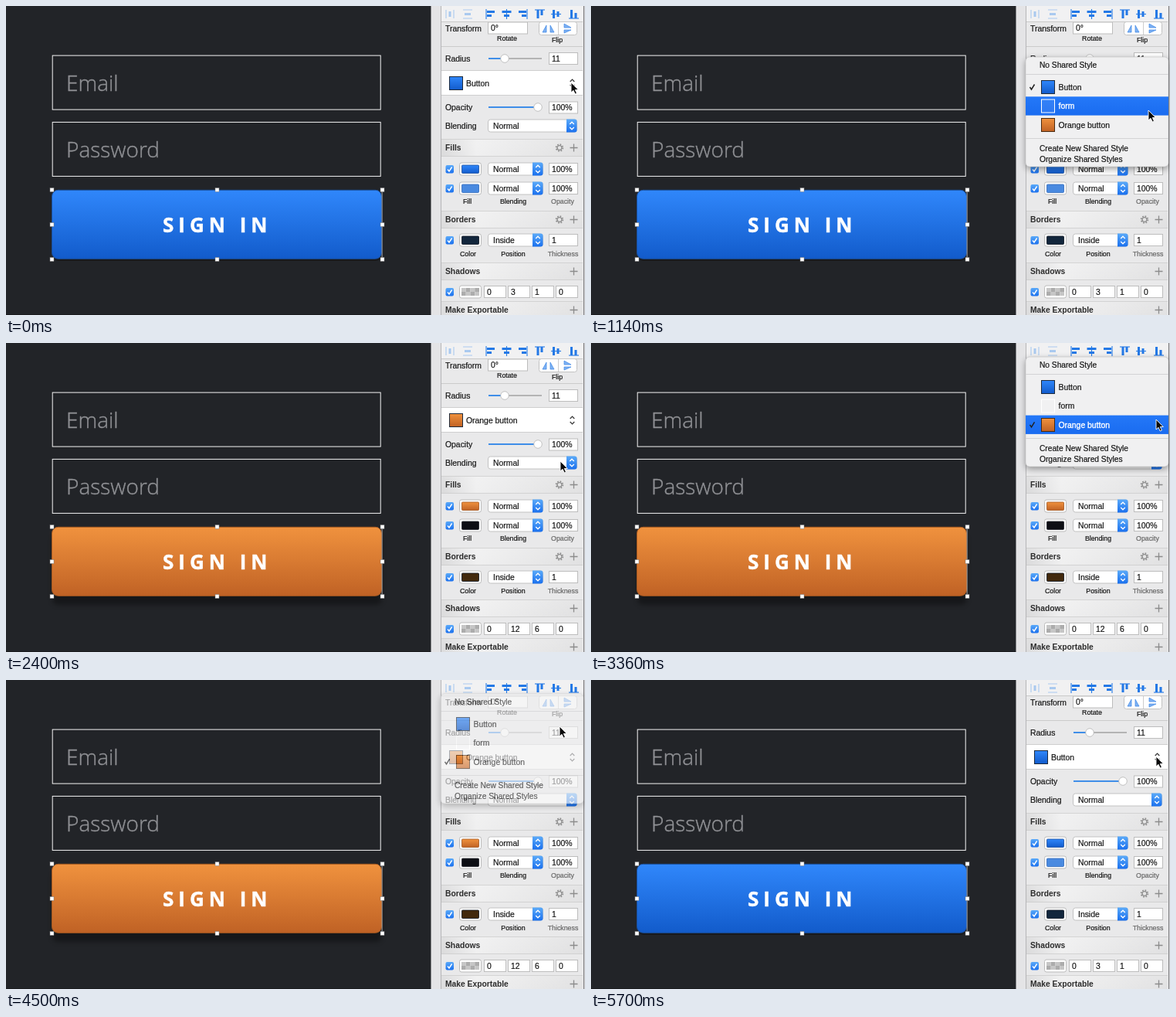
Animation of 750x400 px, one loop 5760 ms. Source, as an HTML page:

```html
<!DOCTYPE html>
<html lang="en">
<head>
<meta charset="utf-8">
<title>Shared styles</title>
<style>
html, body { margin: 0; width: 100%; height: 100%; overflow: hidden; background: #222428; }
svg { display: block; width: 750px; height: 400px; }
text { font: 10.4px "Liberation Sans", Arial, sans-serif; fill: #161616; stroke: #161616; stroke-width: .2px; white-space: pre; }
text.b { font-weight: bold; fill: #2c2c2c; stroke: none; font-size: 10.3px; }
text.s { font-size: 8.8px; }
text.cmd { font-size: 10.2px; }
text.dim { fill: #666; stroke: #666; }
text.on { fill: #fff; stroke: #fff; stroke-width: .35px; }
text.in { font: 300 28px "Open Sans", sans-serif; fill: #8f9094; stroke: #8f9094; stroke-width: .4px; }
text.cta { font: 700 26px "Open Sans", sans-serif; letter-spacing: 6px; fill: #fff; stroke: #fff; stroke-width: .5px; }
</style>
</head>
<body>
<svg id="stage" viewBox="0 0 750 400" xmlns="http://www.w3.org/2000/svg"></svg>
<script>
const LOOP = 5760, STEP = 60;
const stage = document.getElementById('stage');

const rect = (x, y, w, h, fill, more = '') =>
  `<rect x="${x}" y="${y}" width="${w}" height="${h}" fill="${fill}" ${more}/>`;
const path = (d, stroke, w = 1, fill = 'none') =>
  `<path d="${d}" stroke="${stroke}" stroke-width="${w}" fill="${fill}"/>`;
const text = (x, y, s, cls = '', more = '') =>
  `<text x="${x}" y="${y}" class="${cls}" ${more}>${s}</text>`;
const small = (x, y, s, cls = '') => text(x, y, s, 's ' + cls, 'text-anchor="middle"');
const group = (id, body) => `<g id="${id}">${body}</g>`;
const grad = (id, a, b) =>
  `<linearGradient id="${id}" x2="0" y2="1"><stop stop-color="${a}"/><stop offset="1" stop-color="${b}"/></linearGradient>`;

const defs = '<defs>' +
  grad('blue', '#3087fb', '#125bcb') +
  grad('orange', '#f0923e', '#c06225') +
  grad('head', '#dcdcdd', '#d6d6d7') +
  grad('hot', '#2478f8', '#1a6cf0') +
  grad('cap', '#5baaf9', '#1a70ee') +
  '<linearGradient id="shine"><stop offset="0" stop-color="#fff" stop-opacity=".1"/>' +
  '<stop offset=".25" stop-color="#fff" stop-opacity=".62"/><stop offset="1" stop-color="#fff" stop-opacity=".25"/></linearGradient>' +
  '<filter id="soft" x="-20%" y="-20%" width="140%" height="150%"><feGaussianBlur stdDeviation="4"/></filter>' +
  '<filter id="blur" x="-20%" y="-20%" width="140%" height="150%"><feGaussianBlur stdDeviation="3"/></filter></defs>';

/* ---- design canvas ---- */
const outline = (y, label) =>
  rect(60.2, y + .1, 425, 70, 'none', 'stroke="#f4f4f4"') + text(78, y + 45.7, label, 'in');

const button = (fill, edge, drop, blur) =>
  rect(60, 238 + drop, 427, 90, '#000', `rx="8" opacity="${blur ? .35 : .3}" ${blur ? 'filter="url(#blur)"' : ''}`) +
  rect(59.5, 238.3, 427, 89, `url(#${fill})`, `rx="8" stroke="${edge}"`);

function handles() {
  let out = path('M487.1 240V328', '#d0d0d0', .8);
  for (const x of [59.5, 273.5, 487.5])
    for (const y of [238, 283, 328])
      if (x !== 273.5 || y !== 283)
        out += rect(x - 2.5, y - 2.5, 5, 5, '#fff', 'stroke="#777" stroke-width=".5"');
  return out;
}

const canvas = rect(0, 0, 551, 400, '#222428') +
  rect(0, 399, 551, 1, '#1a1b1e') +
  outline(64, 'Email') + outline(150.3, 'Password') +
  group('btnBlue', button('blue', '#1a4f9c', 2, false)) +
  group('btnOrange', button('orange', '#a85a20', 11, true)) +
  text(203, 293, 'SIGN IN', 'cta') + handles();

/* ---- inspector widgets ---- */
const field = (x, y, w, s) =>
  rect(x + .5, y - 7.5, w, 15, '#fff', 'stroke="#bdbdbd"') + text(x + 4, y + 3.6, s);

const arrows = (x, y, color, w = 1.3) =>
  path(`M${x - 2.8} ${y - 2}l2.8 -2.8l2.8 2.8M${x - 2.8} ${y + 2}l2.8 2.8l2.8 -2.8`, color, w);

const select = (x, y, w, s) =>
  rect(x + .5, y - 8, w, 16, '#fff', 'rx="3" stroke="#c2c2c2"') +
  `<path d="M${x + w - 13} ${y - 8.5}h10.5a3 3 0 0 1 3 3v11a3 3 0 0 1 -3 3h-10.5z" fill="url(#cap)"/>` +
  arrows(x + w - 6, y, '#fff') + text(x + 7, y + 3.6, s);

const check = y => rect(569.5, y - 5, 10.5, 10.5, 'url(#cap)', 'rx="2"') +
  path(`M572 ${y + .5}l2 2.5l3.6 -5.5`, '#fff', 1.4);

const well = y => rect(587.5, y - 8, 28, 16, '#fdfdfd', 'rx="2.5" stroke="#bcbcbc"');
const chip = (y, fill, edge) => rect(590.5, y - 5, 22, 10.5, fill, `rx="1" stroke="${edge}" stroke-width=".8"`);

const slider = (y, x, end) => path(`M625 ${y}H${end}`, '#b4b4b4', 2) +
  path(`M625 ${y}H${x}`, '#3f8ee8', 2) +
  `<circle cx="${x}" cy="${y}" r="5.3" fill="#fff" stroke="#b5b5b5" stroke-width=".8"/>`;

const plus = y => path(`M730.5 ${y}H740.5M735.5 ${y - 5}V${y + 5}`, '#8c8c8c', 1.3);
const gear = y => `<circle cx="717" cy="${y}" r="4.3" fill="none" stroke="#909090" stroke-width="1.9" stroke-dasharray="1.7 1.68"/>` +
  `<circle cx="717" cy="${y}" r="2.9" fill="none" stroke="#909090" stroke-width="1.3"/>`;

const header = (y, h, s, hasGear) =>
  rect(564, y, 183, h, 'url(#head)') + rect(564, y, 183, h, 'url(#shine)') +
  path(`M564 ${y + .5}H747M564 ${y + h - .5}H747`, '#cdcdcd', .8) +
  text(569, y + 15, s, 'b') + plus(y + 11.5) + (hasGear ? gear(y + 11.5) : '');

const swatch = (x, y, fill, edge = '#1d2a3c') => rect(x + .5, y + .5, 17, 17, fill, `stroke="${edge}"`);

function toolbar() {
  const c = '#2479e6', faint = '#a9c9ef';
  const bars = (x, d, color = c) => path(d.replace(/X/g, x), color, 1.1);
  const block = (x, y, w, h, color = c) => rect(x, y, w, h, color);
  return rect(564, 0, 183, 20, '#f1f1f2') + path('M564 20.5H747', '#c9c9c9') +
    bars(570, 'MX 5V16M580 5V16', faint) + block(573.5, 7, 3, 7, faint) +
    bars(592, 'MX 5H604M592 16H604', faint) + block(594, 9, 8, 3, faint) +
    bars(622, 'MX 4V17') + block(623, 6, 10, 3) + block(623, 11, 6, 3) +
    bars(648.5, 'MX 4V17') + block(642.5, 6, 12, 3) + block(645, 11, 7, 3) +
    bars(675, 'MX 4V17') + block(664, 6, 10, 3) + block(668, 11, 6, 3) +
    bars(685, 'MX 5H698') + block(687.5, 5, 3, 11) + block(692.5, 5, 3, 7) +
    bars(706, 'MX 10.5H719') + block(708, 5, 3, 11) + block(713.5, 7, 3, 7) +
    bars(729, 'MX 16H742') + block(731, 5, 3, 11) + block(736.5, 9, 3, 7);
}

const look = (name, fill, edge, second, secondEdge, border, drop, blur) =>
  swatch(574, 91, `url(#${fill})`) + text(596, 104, name) +
  chip(211, `url(#${fill})`, edge) + chip(236, second, secondEdge) + chip(303, border, '#0c1420') +
  field(650, 370, 28, drop) + field(681, 370, 28, blur);

const checker = [0, 1, 2, 3, 4, 5, 6, 7].map(i =>
  rect(590 + (i % 4) * 5.75, 365 + (i >> 2) * 5, 5.75, 5, (i + (i >> 2)) % 2 ? '#acacac' : '#c6c6c6')).join('');

const panel = rect(550.5, 0, 199.5, 400, '#e4e4e6') +
  rect(563, 0, 185, 400, '#e9e9ea') +
  path('M563.5 0V400', '#b5b5b7') + path('M748.5 0V400', '#77777a') + rect(749, 0, 1, 400, '#dcdcde') +
  text(569, 33, 'Transform') + field(624, 28.5, 51, '0°') + small(649, 45, 'Rotate') +
  rect(690.5, 20.5, 49, 17, '#fff', 'rx="3" stroke="#c2c2c2"') + path('M715.5 21V37', '#cccccc') +
  path('M700 25v9h-5zM705 25v9h5z', '#3b86e6', .7, '#7fb2f3') +
  path('M723 28v-5l9 5zM723 31v4l9 -4z', '#3b86e6', .7, '#7fb2f3') +
  small(714, 47, 'Flip') + toolbar() +
  path('M564 52.5H747', '#cbcbcb') +
  text(569, 72, 'Radius') + slider(68, 646, 694) + field(703, 68, 37, '11') +
  group('stepper', rect(729, 60.5, 11.5, 15, '#f3f3f3', 'stroke="#c5c5c5" stroke-width=".8"') +
    path('M732.7 66l2 -2.6l2 2.6zM732.7 70l2 2.6l2 -2.6z', 'none', 0, '#777')) +
  rect(564, 84, 183, 31, '#fff') + path('M564 83.5H747M564 115.5H747', '#cfcfcf') +
  arrows(733.5, 100, '#333', 1.2) +
  text(569, 135, 'Opacity') + slider(131, 689, 692) + field(703, 131.5, 37, '100%') +
  text(569, 158.7, 'Blending') + select(624, 155, 115, 'Normal') +
  header(172, 23, 'Fills', true) +
  [211, 236].map(y => check(y) + well(y) + select(624, y, 71, 'Normal') + field(703, y, 37, '100%')).join('') +
  small(597.5, 256, 'Fill') + small(657, 256, 'Blending') + small(721, 256, 'Opacity', 'dim') +
  header(265, 23, 'Borders', true) +
  check(303) + well(303) + select(624, 303, 71, 'Inside') + field(703, 303, 37, '1') +
  small(598.5, 324, 'Color') + small(657, 324, 'Position') + small(721.5, 324, 'Thickness', 'dim') +
  header(332, 23, 'Shadows', false) +
  check(370) + well(370) + checker + field(619, 370, 28, '0') + field(712, 370, 28, '0') +
  header(382, 24, 'Make Exportable', false) +
  group('lookBlue', look('Button', 'blue', '#1b4f9e', '#4a8ae0', '#2f69ba', '#12263c', '3', '1')) +
  group('lookOrange', look('Orange button', 'orange', '#a4561f', '#0d0e14', '#22242c', '#42290d', '12', '6'));

/* ---- style menu ---- */
const ROW = 24.3, ROWS_TOP = 93;
const rows = ['Button', 'form', 'Orange button'];
const icon = [
  swatch(583, 96, 'url(#blue)'),
  rect(583.5, 121, 17, 17, '#fff', 'fill-opacity=".08" stroke="#fff"'),
  swatch(583, 145, 'url(#orange)', '#4a2a10')
];
const menu = group('menu',
  rect(563, 69, 185, 142, '#000', 'rx="5" opacity=".38" filter="url(#soft)"') +
  rect(563, 66, 185, 142, '#f0f0f1', 'rx="5" stroke="#c0c0c2" stroke-width=".6"') +
  `<rect id="bar" x="563" width="185" height="${ROW}" fill="url(#hot)"/>` +
  path('M563 88.5H748M563 171.5H748', '#d3d3d5') +
  text(581, 80, 'No Shared Style', 'cmd') +
  rows.map((s, i) => icon[i] + text(605.5, 109 + i * 24.4, s, '', `id="row${i}"`)).join('') +
  group('mark', path('M568.5 105l2 3l4 -6.5', '#222', 1.5)) +
  text(581, 188, 'Create New Shared Style', 'cmd') + text(581, 202, 'Organize Shared Styles', 'cmd'));

const cursors =
  group('arrow', path('M0 0V13L3 10.3L5.2 15L7.4 14L5.3 9.5H9.3Z', '#fff', .9, '#0a0a0a')) +
  group('beam', path('M-3 -6.5Q0 -6.5 0 -4.5V4.5Q0 6.5 -3 6.5M3 -6.5Q0 -6.5 0 -4.5M0 4.5Q0 6.5 3 6.5M-1.5 2.5H1.5', '#222', 1.1));

stage.innerHTML = defs + canvas + panel + menu + cursors;

/* ---- timeline ---- */
const el = id => document.getElementById(id);
const show = (id, on) => el(id).setAttribute('visibility', on ? 'visible' : 'hidden');
const move = (id, x, y) => el(id).setAttribute('transform', `translate(${x} ${y})`);

// time, x, y of the pointer
const track = [
  [0, 732, 99], [60, 732, 99], [600, 722, 106], [960, 722, 106], [1140, 722, 135],
  [1440, 718, 153], [2940, 718, 153], [3240, 732, 99], [3720, 732, 99], [4080, 717, 60],
  [4560, 717, 60], [4740, 718, 62], [5100, 717, 9], [5220, 718, 10], [5460, 727, 45],
  [5700, 732, 99], [LOOP, 732, 99]
];
const menus = [
  { open: 120, fade: 1800, shut: 2040, dy: 0, mark: 0 },
  { open: 3300, fade: 4380, shut: 4620, dy: -48, mark: 2 }
];

function pointer(t) {
  const i = track.findIndex(k => k[0] > t);
  const [t0, x0, y0] = track[i - 1], [t1, x1, y1] = track[i];
  const p = (t - t0) / (t1 - t0), e = p * p * (3 - 2 * p);
  return [x0 + (x1 - x0) * e, y0 + (y1 - y0) * e];
}

function draw(t) {
  const [x, y] = pointer(t);
  const m = menus.find(k => t >= k.open && t < k.shut);
  show('menu', m);
  if (m) {
    const gone = Math.max(0, (t - m.fade) / (m.shut - m.fade));
    el('menu').setAttribute('opacity', 1 - gone ** 1.5);
    move('menu', 0, m.dy);
    move('mark', 0, m.mark * 24.4);
    const blink = t >= m.fade - 120 && t < m.fade - 60;
    const over = t >= m.fade || blink ? -1 : Math.floor((y - m.dy - ROWS_TOP) / ROW);
    el('bar').setAttribute('y', ROWS_TOP + over * ROW);
    el('bar').setAttribute('opacity', over < 0 ? 0 : 1);
    rows.forEach((_, i) => el('row' + i).setAttribute('class', i === over ? 'on' : ''));
  }
  const orangeLook = t >= 2040 && t < 4620;
  const orangeBtn = t >= 2160 && t < 4680;
  show('lookBlue', !orangeLook);
  show('lookOrange', orangeLook);
  show('btnBlue', !orangeBtn);
  show('btnOrange', orangeBtn);

  const typing = !m && x > 703 && y >= 59 && y <= 76;
  show('stepper', typing);
  show('beam', typing);
  show('arrow', !typing);
  move(typing ? 'beam' : 'arrow', x, y);
}

function frame() {
  const t = performance.now() % LOOP;
  draw(Math.floor(t / STEP) * STEP);
  requestAnimationFrame(frame);
}
frame();
</script>
</body>
</html>
```
